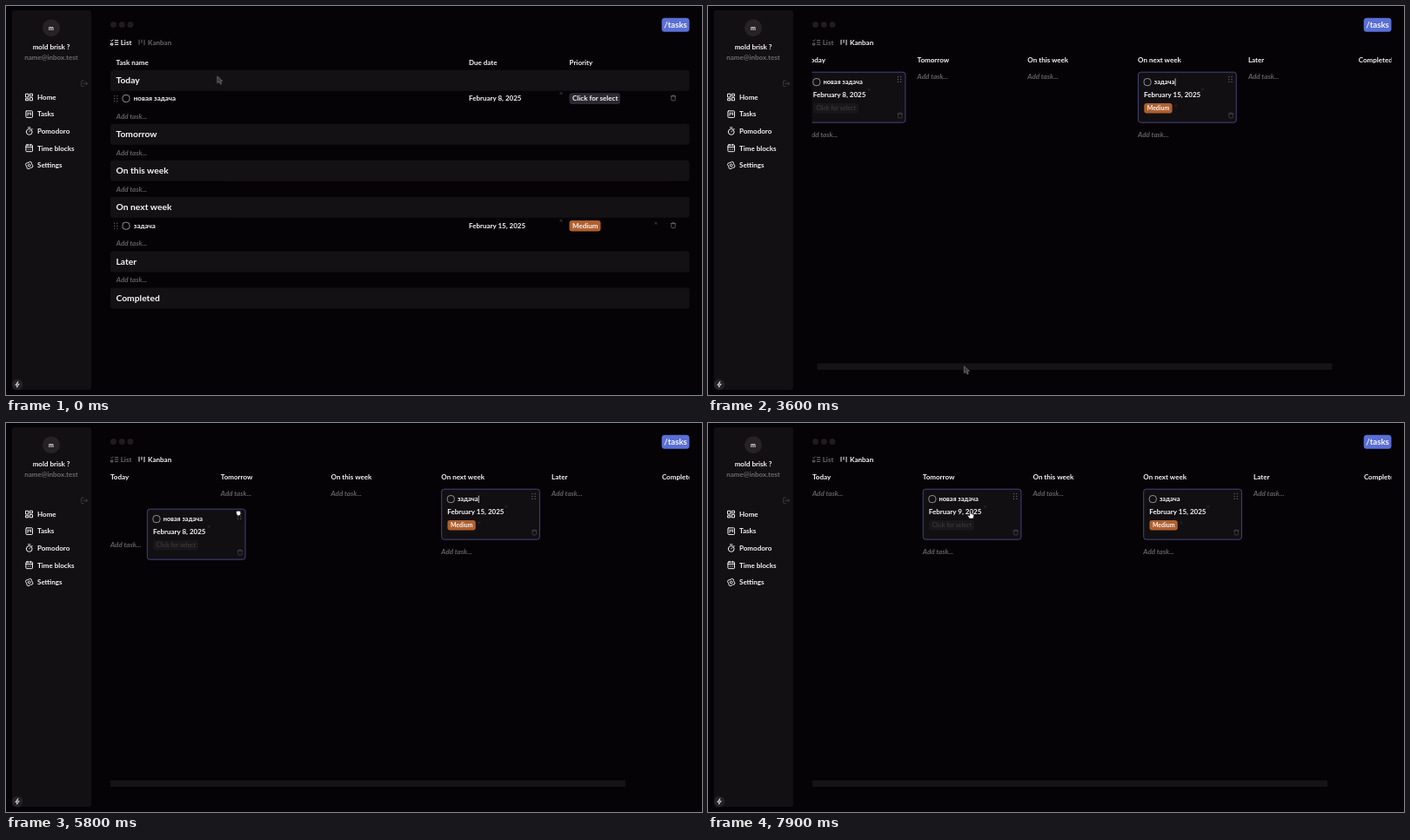
Animation of 800x448 px, one loop 8000 ms. Source, as an HTML page:

```html
<!DOCTYPE html>
<html lang="en">
<head>
<meta charset="utf-8">
<title>Tasks</title>
<style>
  html, body { margin: 0; width: 100%; height: 100%; overflow: hidden; background: #060307; }
  svg { display: block; width: 800px; height: 448px; }
  text { font: 700 8px Lato, "Noto Sans", sans-serif; fill: #f6f5f6; white-space: pre; }
  .add { font-style: italic; fill: #656266; }
  .line { fill: none; stroke: #f0eff0; stroke-width: 1; stroke-linecap: round; stroke-linejoin: round; }
</style>
</head>
<body>
<svg id="stage" viewBox="0 0 800 448">
  <defs><clipPath id="board-clip"><rect x="119.5" y="54" width="666" height="372"/></clipPath></defs>
</svg>
<script>
const LOOP = 8000, STEP = 100;
const SVG = 'http://www.w3.org/2000/svg';
const stage = document.getElementById('stage');

function el(parent, tag, attrs = {}) {
  const node = document.createElementNS(SVG, tag);
  for (const key in attrs) node.setAttribute(key, attrs[key]);
  parent.appendChild(node);
  return node;
}
const group = (parent, x = 0, y = 0) => el(parent, 'g', { transform: `translate(${x} ${y})` });
const box = (p, x, y, width, height, fill, rx = 3) => el(p, 'rect', { x, y, width, height, fill, rx });
const dot = (p, cx, cy, r, fill) => el(p, 'circle', { cx, cy, r, fill });
const line = (p, d, attrs = {}) => el(p, 'path', { d, class: 'line', ...attrs });
const move = (node, x, y) => node.setAttribute('transform', `translate(${x} ${y})`);
const show = (node, on) => node.setAttribute('visibility', on ? 'visible' : 'hidden');

function label(p, str, x, y, { size = 8, color, cls = '', anchor = 'start' } = {}) {
  const t = el(p, 'text', { x, y, class: cls, 'text-anchor': anchor });
  t.style.fontSize = size + 'px';
  if (color) t.style.fill = color;
  t.textContent = str;
  return t;
}
const addTask = (p, x, y) => label(p, 'Add task...', x, y, { cls: 'add' });

function grip(p, x, y) {
  for (let i = 0; i < 6; i++) dot(p, x + (i % 2 ? 1.6 : -1.6), y + (Math.floor(i / 2) - 1) * 2.9, 0.7, '#656267');
}
const check = (p, x, y) =>
  el(p, 'rect', { x: x - 4, y: y - 4, width: 8, height: 8, rx: 3.1, fill: 'none', stroke: '#a19fa2', 'stroke-width': 0.9 });
const cross = (p, x, y, stroke = '#5b585c') =>
  line(group(p, x, y), 'M-1.2-1.2 1.2 1.2M1.2-1.2-1.2 1.2', { style: `stroke:${stroke};stroke-width:.6` });
const trash = (p, x, y, stroke = '#777478') =>
  line(group(p, x, y), 'M-2.8-2H2.8M-1-2V-3H1V-2M-2.2-2V2.2Q-2.2 3-1.4 3H1.4Q2.2 3 2.2 2.2V-2', { style: `stroke:${stroke};stroke-width:.7` });

function sidebar() {
  box(stage, 7, 5, 91, 437, '#131013', 3);
  dot(stage, 52, 25.3, 10, '#262226');
  const mid = { anchor: 'middle' };
  label(stage, 'm', 52, 27.7, { ...mid, size: 7 });
  label(stage, 'mold brisk ?', 52, 50.2, mid);
  label(stage, 'name@inbox.test', 52, 61.6, { ...mid, color: '#6d6a6e' });
  line(group(stage, 90, 89.3), 'M-1-3.3H-2.5Q-3.3-3.3-3.3-2.5V2.5Q-3.3 3.3-2.5 3.3H-1M-1 0H3.5M1.7-1.8 3.5 0 1.7 1.8',
    { style: 'stroke:#4b484c;stroke-width:.8' });

  const cog = Array.from({ length: 16 }, (_, i) => {
    const a = (i + 0.5) * Math.PI / 8, r = i % 4 < 2 ? 4.3 : 3.4;
    return (r * Math.cos(a)).toFixed(2) + ' ' + (r * Math.sin(a)).toFixed(2);
  }).join('L');
  const ring = r => `M${-r} 0a${r} ${r} 0 1 0 ${2 * r} 0a${r} ${r} 0 1 0 ${-2 * r} 0`;
  const frame = 'M-3-3.8H3Q3.8-3.8 3.8-3V3Q3.8 3.8 3 3.8H-3Q-3.8 3.8-3.8 3V-3Q-3.8-3.8-3-3.8Z';
  const menu = [
    ['Home', 'M-3.8-3.8H-.9V0H-3.8ZM.9-3.8H3.8V-1.2H.9ZM-3.8 1.7H-.9V3.8H-3.8ZM.9.6H3.8V3.8H.9Z'],
    ['Tasks', frame + 'M-1.8-1.7V1.5M0-1.7V.1M1.8-1.7V.8'],
    ['Pomodoro', 'M-3.4.7a3.4 3.4 0 1 0 6.8 0a3.4 3.4 0 1 0-6.8 0M-1.2-4.3H1.2M0 .7 1.3-.7M3-3 3.6-2.4'],
    ['Time blocks', frame + 'M-3.8-1.4H3.8M-1.8-4.6V-3M1.8-4.6V-3M-1.7 1H-1.6M0 1H.1M1.7 1H1.8'],
    ['Settings', `M${cog}Z` + ring(1.4)]
  ];
  menu.forEach(([name, icon], i) => {
    const y = 105 + i * 19.62;
    line(group(stage, 26.7, y), icon);
    label(stage, name, 36, y + 2.8);
  });
  dot(stage, 13, 436, 6.2, '#252226');
  line(group(stage, 13, 436), 'M.6-3.2-2.2.6H0L-.6 3.2 2.2-.6H0Z', { style: 'stroke-width:.8' });
}

function topBar() {
  [123.5, 133.3, 143].forEach(x => dot(stage, x, 21.5, 3.5, '#1f1b1f'));
  box(stage, 753.7, 13.7, 31.8, 16, '#5a6fd6', 3.5);
  label(stage, '/tasks', 769.6, 25, { size: 9.7, anchor: 'middle' });
  const tab = (x, name, dx, icon) => {
    const g = group(stage, x, 42);
    line(g, icon, { style: 'stroke:#f6f5f6' });
    label(g, name, dx, 2.9);
    return g;
  };
  return [
    tab(120, 'List', 11.7, 'M.5-2.3 1.4-1.4 3-3.1M.8 1H2.8V3H.8ZM5.3-2.4H8.8M5.3 0H8.8M5.3 2.4H8.8'),
    tab(152, 'Kanban', 11, 'M1-2.8V2.2M4-2.8V.2M7-2.8V2.8')
  ];
}

function listView() {
  const g = group(stage);
  [['Task name', 126.5], ['Due date', 532], ['Priority', 647.5]].forEach(([s, x]) => label(g, s, x, 67.8));
  const sections = [['Today', 85.7], ['Tomorrow', 147.8], ['On this week', 189.8],
    ['On next week', 231.8], ['Later', 294.4], ['Completed', 336.4]];
  sections.forEach(([s, y]) => {
    box(g, 120, y - 12, 665.5, 24, '#141114');
    label(g, s, 126.5, y + 3.5, { size: 10.3 });
  });
  [127, 169, 211, 273, 315.3].forEach(y => addTask(g, 126.8, y + 2.7));
  const row = (y, name, date, tag, width, fill) => {
    grip(g, 126.2, y);
    check(g, 138, y);
    label(g, name, 146.8, y + 2.7);
    label(g, date, 532, y + 2.8);
    cross(g, 638, y - 6);
    box(g, 647.5, y - 6.3, width, 12.7, fill);
    label(g, tag, 651, y + 2.7);
    trash(g, 767, y - 0.6);
  };
  row(106.5, 'новая задача', 'February 8, 2025', 'Click for select', 58.5, '#2c282f');
  row(253.2, 'задача', 'February 15, 2025', 'Medium', 36, '#b0602f');
  cross(g, 747, 250.2);
  return g;
}

function card(parent, name, date, tag, width, fill, ink) {
  const g = group(parent);
  el(g, 'rect', { x: 0.4, y: 0.4, width: 112.7, height: 58, rx: 3, fill: '#120f13', stroke: '#484c86', 'stroke-width': 0.9 });
  const body = group(g);
  check(body, 11, 11.8);
  label(body, name, 18.7, 14.3, { size: 7.5 });
  const day = label(body, date, 7, 29);
  grip(body, 106.3, 8.6);
  cross(body, 71.5 + (ink ? 0 : 3), 20.5, '#3a373b');
  box(body, 7.2, 36.2, width, 11.6, fill);
  label(body, tag, 10.6, 44.5, { size: 6.95, color: ink });
  if (!ink) cross(body, 43.5, 39, '#3a373b');
  trash(body, 107, 50.2, '#4d4a4e');
  return { g, body, day };
}

const COLS = [120, 246.8, 373.5, 500.3, 627.1, 753.9];

function boardView() {
  const g = el(stage, 'g', { 'clip-path': 'url(#board-clip)' });
  const inner = group(g);
  ['Today', 'Tomorrow', 'On this week', 'On next week', 'Later', 'Completed']
    .forEach((s, i) => label(inner, s, COLS[i], 64.5));
  const adds = COLS.slice(0, 5).map((x, i) => addTask(group(inner, x, 84.2), 0, 0).parentNode);
  move(adds[3], COLS[3], 151.3);
  const fixed = card(inner, 'задача', 'February 15, 2025', 'Medium', 32.3, '#b0602f');
  move(fixed.g, COLS[3], 75.8);
  const caret = line(fixed.g, 'M43 8.2V15.8', { style: 'stroke-width:.8' });
  const moved = card(inner, 'новая задача', 'February 8, 2025', 'Click for select', 52, '#1a171b', '#39363a');
  const thumb = box(g, 120, 411.6, 592, 7.4, '#161316', 1);
  return { g, inner, adds, fixed, moved, caret, thumb };
}

function cursors() {
  const make = (d, fill, stroke) => {
    const g = group(stage);
    el(g, 'path', { d, fill, stroke, 'stroke-width': 0.7, 'stroke-linejoin': 'round' });
    return g;
  };
  return {
    arrow: make('M.4.4V8.2L2.4 6.4 3.8 9.6 5.3 9 3.9 5.9H6.4Z', '#3c393d', '#79767a'),
    hand: make('M-.8 0Q0-.8.8 0V3L3.6 3.8Q4.4 4.1 4.2 5L3.4 8.6H-.9L-3.2 5.4Q-3.2 4.4-2.2 4.7L-.8 5.6Z', '#fff', '#151215'),
    grab: make('M-2.6-1.4Q-2.2-2.8-1-2.3Q0-3.2 1-2.3Q2.6-2.6 2.6-1V.8Q2.2 2.8.8 3H-1Q-2.8 1.4-2.6-1.4Z', '#fff', '#151215')
  };
}

// Rows of [time, ...values], eased between neighbours.
function track(rows, t) {
  let i = rows.findIndex(r => r[0] > t);
  if (i < 0) return rows[rows.length - 1].slice(1);
  if (i === 0) return rows[0].slice(1);
  const a = rows[i - 1], b = rows[i];
  const u = (t - a[0]) / (b[0] - a[0]), e = u * u * (3 - 2 * u);
  return a.slice(1).map((v, k) => v + (b[k + 1] - v) * e);
}

const SWITCH = 2000, PICK = 5500, OVER = 5900, DROP = 6700;
const PATH = [
  [0, 242.5, 80.5], [300, 240, 78], [1100, 165.5, 48.5], [1400, 172, 41], [1900, 172, 41],
  [2200, 159.5, 89.5], [2900, 270, 330], [3300, 289, 414.5], [3500, 289, 414.5],
  [3600, 294, 414.5], [3900, 363, 416], [4000, 363, 416], [4400, 289, 416],
  [4800, 218.5, 134.5], [5200, 226, 82], [PICK, 225, 81],
  [5900, 275, 108], [6300, 337, 95], [6600, 349, 83], [DROP, 352, 81],
  [7300, 250, 204], [7500, 250, 203], [7800, 300, 102], [7900, 301.5, 101.5]
];
const SCROLL = [[3500, 0], [3600, 6.2], [3900, 83], [4000, 83], [4400, 0]];

sidebar();
const tabs = topBar();
const list = listView();
const board = boardView();
const pointer = cursors();

function draw(t) {
  const kanban = t >= SWITCH;
  show(list, !kanban);
  show(board.g, kanban);
  tabs[0].setAttribute('opacity', kanban ? 0.42 : 1);
  tabs[1].setAttribute('opacity', kanban ? 1 : 0.42);

  const [x, y] = track(PATH, t);
  const [scroll] = track(SCROLL, t);
  move(board.inner, -scroll, 0);
  board.thumb.setAttribute('x', 120 + scroll * 74 / 83);

  const fade = Math.min(1, 0.4 + (t - SWITCH) / 500);
  for (const c of [board.fixed, board.moved]) c.body.setAttribute('opacity', Math.max(0, fade));

  const dragging = t >= PICK && t < DROP, dropped = t >= DROP;
  if (dragging) move(board.moved.g, x - 105.2, y - 5);
  else move(board.moved.g, COLS[dropped ? 1 : 0], 75.8);
  board.moved.day.textContent = `February ${dropped ? 9 : 8}, 2025`;
  move(board.adds[0], COLS[0], dropped ? 84.2 : dragging ? 142.9 : 151.3);
  move(board.adds[1], COLS[1], dropped ? 151.3 : dragging && t >= OVER ? 142.9 : 84.2);
  board.caret.style.display = dropped ? 'none' : '';

  const overTab = t >= 1300 && t < 2100, overDate = t >= 7700;
  const kind = dragging ? 'grab' : overTab || overDate ? 'hand' : 'arrow';
  for (const k in pointer) show(pointer[k], k === kind);
  move(pointer[kind], x, y);
}

const start = performance.now();
function tick() {
  const t = (performance.now() - start) % LOOP;
  draw(Math.floor(t / STEP) * STEP);
  requestAnimationFrame(tick);
}
tick();
</script>
</body>
</html>
```
